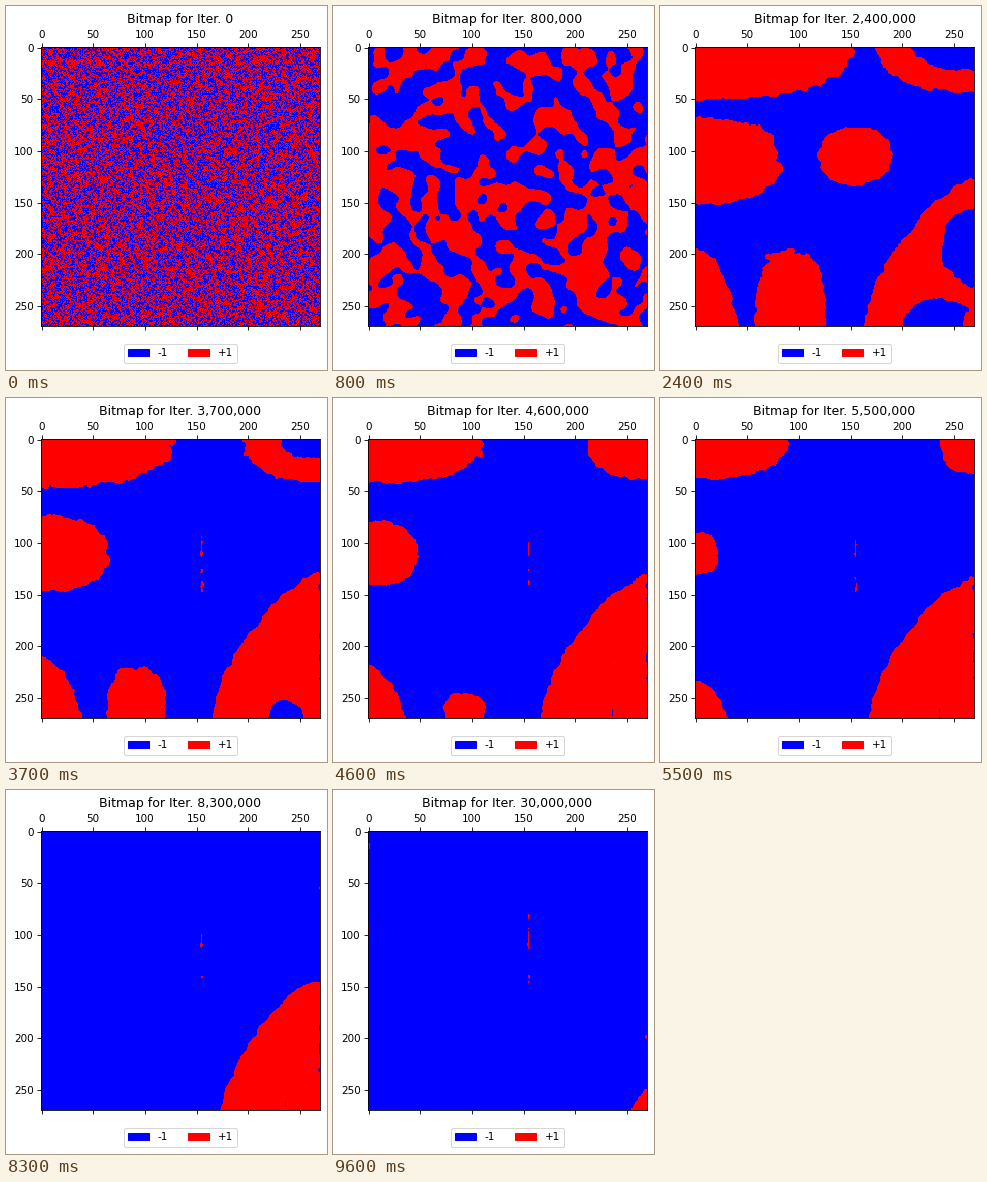
Animation, 321 px wide and 364 px high, one loop 9700 ms. Source, as a matplotlib script:

```python
import numpy as np
import matplotlib.pyplot as plt
from matplotlib.animation import FuncAnimation
from matplotlib.colors import ListedColormap
from matplotlib.patches import Patch

W, H, DPI = 321, 364, 75
N = 270                                   # cells per side
LEFT, TOP, SIDE = 35, 41, 279             # plot square in pixels
FRAMES, STEP, LAST = 97, 100_000, 30_000_000
MERGED = 2.4                              # million iterations until few domains remain

plt.rcParams["font.family"] = "DejaVu Sans"
rng = np.random.default_rng(7)

start = rng.random((N, N)) < 0.5
first_visit = rng.exponential(N * N / 1e6, (N, N))
Y, X = np.mgrid[:N, :N]


def blur(a, sigma):
    """Periodic Gaussian blur, scaled to unit spread."""
    f = np.fft.fftfreq(N)
    k = np.exp(-2 * (np.pi * sigma) ** 2 * (f[:, None] ** 2 + f ** 2))
    b = np.fft.ifft2(np.fft.fft2(a) * k).real
    return (b - b.mean()) / b.std()


rough = blur(rng.standard_normal((N, N)), 3)


def domain(t, center, size, end, shape=2.5, power=(0.5, 0.25)):
    """Superellipse shrinking to nothing at time end; positive inside."""
    left = max(end - t, 1e-6)
    a, b = (s * left ** p for s, p in zip(size, power))
    dx, dy = abs(X - center[0]) / a, abs(Y - center[1]) / b
    return (1 - (dx ** shape + dy ** shape) ** (1 / shape)) * min(a, b)


def domains(t):
    """Large red domains and the blue pockets cut into them."""
    top_right = np.minimum(
        domain(t, (N, 0), (50, 38), 5.95, 2.3, (0.5, 0.1)),
        -domain(t, (N, 0), (40, 18), 4.6))
    bottom_right = np.minimum.reduce([
        domain(t, (N, N), (82, 109), 12, 1.45, (0.12, 0.12)),
        -domain(t, (N, 193), (38, 40), 3.1, 2),
        -domain(t, (236, N), (26, 24), 4.1, 2)])
    return np.maximum.reduce([
        top_right,
        bottom_right,
        domain(t, (0, 0), (68.5, 33.8), 7.2),
        domain(t, (0, 110), (45, 31), 5.7),
        domain(t, (0, N), (29.5, 38), 6.5, 1.5, (0.25, 0.5)),
        domain(t, (92, N), (27, 45), 4.9, 3, (0.25, 0.5)),
        domain(t, (155, 105), (45, 32), 3.0, 2.2),
        domain(t, (N, N), (12, 18), LAST, 2.5, (0, 0)),   # stays pinned
    ])


def iteration(i):
    return i * STEP if i < FRAMES - 1 else LAST


def bitmap(i):
    if i == 0:
        return start
    t = iteration(i) / 1e6
    jitter = blur(np.random.default_rng(i).standard_normal((N, N)), 1.2)
    field = domains(t) + 0.8 * rough + 0.35 * jitter
    if t < MERGED:
        # Grains grow as the square root of time, then give way to the domains
        u = np.clip((t - 0.4) / (MERGED - 0.4), 0, 1)
        w = u * u * (3 - 2 * u)
        grains = blur(start, 5.6 * np.sqrt(t))
        field = (1 - w) * grains + w * np.clip(field / 10, -1.5, 1.5)
    return np.where(first_visit < t, field > 0, start)


fig = plt.figure(figsize=(W / DPI, H / DPI), dpi=DPI, facecolor="white")
ax = fig.add_axes([LEFT / W, 1 - (TOP + SIDE) / H, SIDE / W, SIDE / H])
image = ax.imshow(start, cmap=ListedColormap(["blue", "red"]), vmin=0, vmax=1,
                  interpolation="nearest", aspect="auto")
ax.xaxis.tick_top()
ax.xaxis.set_ticks_position("both")
ax.tick_params(axis="x", labeltop=True, labelbottom=False)
ax.set_xticks(range(0, N, 50))
ax.set_yticks(range(0, N, 50))
title = ax.set_title("", fontsize=12)
ax.legend(handles=[Patch(color="blue", label="-1"), Patch(color="red", label="+1")],
          loc="upper center", bbox_to_anchor=(0.5, -0.047), ncol=2, fontsize=10)


def draw(i):
    image.set_data(bitmap(i))
    title.set_text(f"Bitmap for Iter. {iteration(i):,}")
    return image, title


anim = FuncAnimation(fig, draw, frames=FRAMES, interval=100, repeat=True,
                     repeat_delay=0, blit=False)
plt.show()
```
